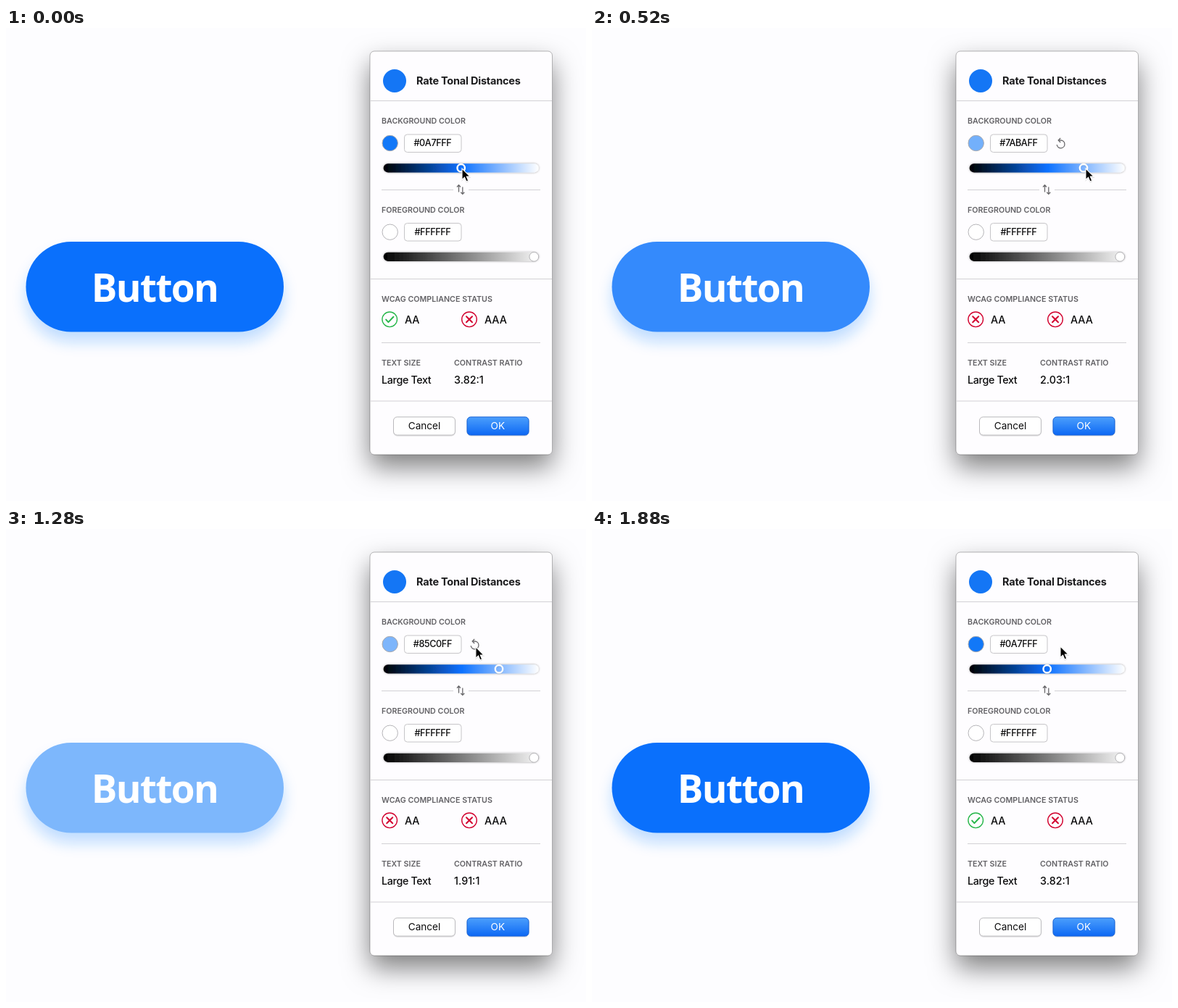
Animation of 800x653 px, one loop 1.92 s. Source, as an HTML page:

```html
<!DOCTYPE html>
<html lang="en">
<head>
<meta charset="utf-8">
<title>Contrast dialog</title>
<style>
  html, body { margin: 0; width: 100%; height: 100%; overflow: hidden; background: #fdfdff; }
  svg { display: block; width: 800px; height: 653px; }
  text { font-family: Inter, "Liberation Sans", sans-serif; fill: #0c0c0d; }
  .title { font-size: 14.5px; font-weight: 700; letter-spacing: -.015em; fill: #1c1c1e; }
  .label { font-size: 10.7px; font-weight: 600; fill: #626165; }
  .value { font-size: 14.3px; font-weight: 500; }
  .tight { letter-spacing: -.025em; }
  .hex { font-size: 12.6px; font-weight: 500; letter-spacing: -.03em; text-anchor: middle; }
  .action { font-size: 13.6px; text-anchor: middle; }
  .big { font: 600 53px "Noto Sans", "Open Sans", sans-serif; letter-spacing: -.03em; fill: #fff; text-anchor: middle; }
  .rule { stroke: #d2d1d4; fill: none; }
  .field { fill: #fff; stroke: #c6c5c8; }
  .icon { fill: none; stroke: #69686b; stroke-width: 1.3; }
  .mark { fill: none; stroke-width: 2; stroke-linecap: round; stroke-linejoin: round; }
  .ring { fill: none; stroke-width: 1.4; }
  .pass { stroke: #27b74a; }
  .fail { stroke: #d2022f; }
</style>
</head>
<body>
<svg viewBox="0 0 800 653" xmlns="http://www.w3.org/2000/svg">
  <defs>
    <linearGradient id="blues">
      <stop stop-color="#000"/>
      <stop offset=".5" stop-color="#0a70ff"/>
      <stop offset="1" stop-color="#fff"/>
    </linearGradient>
    <linearGradient id="grays">
      <stop stop-color="#000"/>
      <stop offset="1" stop-color="#f6f6f6"/>
    </linearGradient>
    <linearGradient id="primary" x2="0" y2="1">
      <stop stop-color="#4c9ffc"/>
      <stop offset="1" stop-color="#0d68f4"/>
    </linearGradient>
    <filter id="panelShadow" x="-40%" y="-20%" width="180%" height="140%">
      <feDropShadow dx="0" dy="17" stdDeviation="18" flood-opacity=".5"/>
    </filter>
    <filter id="glow" x="-20%" y="-40%" width="140%" height="200%">
      <feGaussianBlur stdDeviation="10"/>
    </filter>
    <filter id="halo" x="-10%" y="-80%" width="120%" height="260%">
      <feDropShadow dx="0" dy="0" stdDeviation="1.8" flood-opacity=".4"/>
    </filter>
    <filter id="soft" x="-50%" y="-50%" width="200%" height="200%">
      <feDropShadow dx="0" dy=".6" stdDeviation=".7" flood-opacity=".25"/>
    </filter>
    <g id="cross">
      <circle class="ring fail" r="10.3"/>
      <path class="mark fail" d="M-4-4 4 4M4-4-4 4"/>
    </g>
    <g id="check">
      <circle class="ring pass" r="10.3"/>
      <path class="mark pass" d="M-5 .3-1.8 3.8 5.2-3.6"/>
    </g>
  </defs>

  <rect x="27.5" y="309" width="355.5" height="124.5" rx="62" fill="#0a80ff" opacity=".25" filter="url(#glow)"/>
  <rect id="pill" x="27.5" y="295" width="355.5" height="124.5" rx="62.2"/>
  <text class="big" x="205" y="377.8">Button</text>

  <rect x="502" y="32" width="251.5" height="557" rx="6" fill="#fefdff" filter="url(#panelShadow)"/>
  <rect x="502" y="32" width="251.5" height="557" rx="6" fill="none" stroke="#000" stroke-opacity=".28"/>
  <path class="rule" d="M502.5 100.5h250.5M502.5 346.5h250.5M502.5 515h250.5M518 223.5h99M638 223.5h99M518 434.5h219"/>

  <circle cx="536" cy="73" r="16" fill="#1476f5"/>
  <text class="title" x="566" y="77.8">Rate Tonal Distances</text>

  <text class="label" x="518" y="132.3">BACKGROUND COLOR</text>
  <circle id="swatch" cx="529.7" cy="159" r="10.7" stroke="#aaa9ad"/>
  <rect class="field" x="549.5" y="147" width="78.5" height="24.5" rx="4"/>
  <text class="hex" id="hex" x="588.4" y="163.4"></text>
  <g id="reset">
    <path class="icon" d="M641.2 161.2A5.4 5.4 0 1 0 646.6 155H643.4"/>
    <path class="icon" d="M646.2 152 643.2 155l3 3"/>
  </g>
  <rect x="520.7" y="187.2" width="214" height="12.2" rx="6.1" fill="url(#blues)" filter="url(#halo)"/>
  <circle id="knob" cy="193.2" r="5.2" fill="none" stroke="#fff" stroke-width="2.4" filter="url(#soft)"/>
  <path class="icon" d="M624.5 226.5v-9.5M622 219.5l2.5-2.7 2.5 2.7M629.8 219.5v9.7M627.3 226.7l2.5 2.7 2.5-2.7"/>

  <text class="label" x="518" y="255.2">FOREGROUND COLOR</text>
  <circle cx="529.7" cy="281.7" r="10.7" fill="#fff" stroke="#b5b4b8"/>
  <rect class="field" x="549.5" y="269.5" width="78.5" height="24.5" rx="4"/>
  <text class="hex" x="588.4" y="286">#FFFFFF</text>
  <rect x="520.7" y="309.7" width="214" height="12.2" rx="6.1" fill="url(#grays)" filter="url(#halo)"/>
  <circle cx="728.3" cy="315.8" r="6.4" fill="#fff" stroke="#b2b1b4"/>

  <text class="label" x="518" y="377.8">WCAG COMPLIANCE STATUS</text>
  <use id="status" x="529.2" y="402.3"/>
  <text class="value" x="550" y="407.6">AA</text>
  <use href="#cross" x="639" y="402.3"/>
  <text class="value" x="660" y="407.6">AAA</text>

  <text class="label" x="518" y="466.4">TEXT SIZE</text>
  <text class="value tight" x="518" y="490.9">Large Text</text>
  <text class="label" x="618" y="466.4">CONTRAST RATIO</text>
  <text class="value" id="ratio" x="618" y="490.9"></text>

  <rect x="534.5" y="537" width="85" height="25" rx="5" fill="#fff" stroke="#bbbabd" filter="url(#soft)"/>
  <text class="action" x="577" y="554.3">Cancel</text>
  <rect x="636" y="537" width="85" height="25" rx="5" fill="url(#primary)" stroke="#1763d8" filter="url(#soft)"/>
  <text class="action" x="678.3" y="554.3" style="fill:#fff">OK</text>

  <path id="cursor" d="M0 0V15.4L3.5 12.1 6 17.9 8.7 16.8 6.3 11.1H11Z" fill="#000" stroke="#fff" stroke-width="1.1" filter="url(#soft)"/>
</svg>
<script>
  const LOOP = 1920, STEP = 40;
  const DRAG_END = 350, LEAVE = 800, ARRIVE = 1360, CLICK = 1400;
  // The dialog trails the pointer, and the artwork trails the dialog.
  const KNOB_LAG = 211, PILL_LAG = 376;
  const BASE = '0A7FFF';
  const colors = [
    [0, BASE], [280, '0A81FF'], [320, '1A88FF'], [360, '2B91FF'], [400, '409BFF'],
    [440, '55A6FF'], [480, '68B1FF'], [520, '7ABAFF'], [560, '85C0FF'], [1640, BASE]
  ];

  const $ = id => document.getElementById(id);
  const mix = (a, b, k) => a + (b - a) * k;
  const channels = hex => [0, 2, 4].map(i => parseInt(hex.slice(i, i + 2), 16));

  function ease(t, from, to) {
    const u = Math.min(1, Math.max(0, (t - from) / (to - from)));
    return u * u * (3 - 2 * u);
  }

  const drag = t => ease(t, 0, DRAG_END);
  const value = t => t < CLICK ? drag(t) : 0;

  function cursorAt(t) {
    const k = ease(t, LEAVE, ARRIVE);
    const rise = k + k * (1 - k) / 2;
    return [mix(mix(629, 681, drag(t)), 646, k), mix(194, 162, rise)];
  }

  function contrastToWhite(hex) {
    const [r, g, b] = channels(hex).map(c => {
      c /= 255;
      return c <= .03928 ? c / 12.92 : ((c + .055) / 1.055) ** 2.4;
    });
    return 1.05 / (.2126 * r + .7152 * g + .0722 * b + .05);
  }

  function blend(from, to, k) {
    const end = channels(to);
    return `rgb(${channels(from).map((c, i) => Math.round(mix(c, end[i], k)))})`;
  }

  function draw(t) {
    const hex = colors.filter(row => row[0] <= t).pop()[1];
    const ratio = contrastToWhite(hex);
    const [x, y] = cursorAt(t);
    $('cursor').setAttribute('transform', `translate(${x} ${y})`);
    $('knob').setAttribute('cx', mix(627.7, 680, value(t - KNOB_LAG)));
    $('pill').setAttribute('fill', blend('0A70FC', '7DB7FC', value(t - PILL_LAG)));
    $('swatch').setAttribute('fill', blend('1278F8', '7DB5FB', (channels(hex)[0] - 10) / 123));
    $('hex').textContent = '#' + hex;
    $('ratio').textContent = (Math.floor(ratio * 100) / 100).toFixed(2) + ':1';
    $('status').setAttribute('href', ratio >= 3 ? '#check' : '#cross');
    $('reset').style.display = hex === BASE ? 'none' : '';
  }

  const start = performance.now();
  function tick() {
    const t = (performance.now() - start) % LOOP;
    draw(Math.floor(t / STEP) * STEP);
    requestAnimationFrame(tick);
  }
  tick();
</script>
</body>
</html>
```
